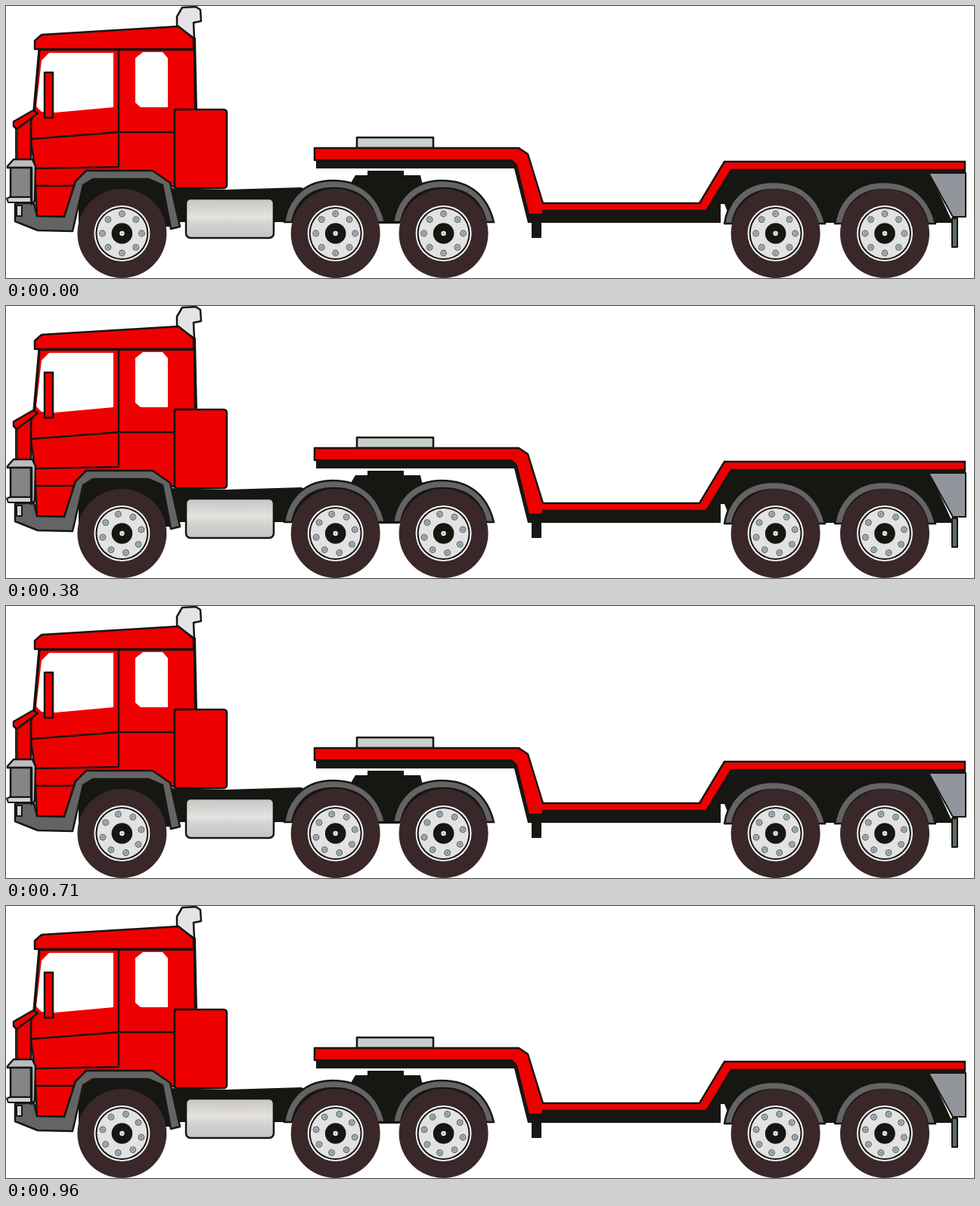
Recreate the animation shown at these times as an HTML page. Size 1280 by 360 pixels, loop 1 s.

```html
<!DOCTYPE html>
<html lang="en">
<head>
<meta charset="utf-8">
<title>Low-loader truck</title>
<style>
html, body { margin: 0; width: 100%; height: 100%; overflow: hidden; background: #fff; }
svg { display: block; width: 1280px; height: 360px; }
.k { fill: #161613; }
.r { fill: #ef0000; }
.g { fill: #646464; }
.o { stroke: #161613; stroke-width: 2.5; stroke-linejoin: round; }
.l { fill: none; stroke: #161613; stroke-width: 2.3; }
</style>
</head>
<body>
<svg viewBox="0 0 1280 360" xmlns="http://www.w3.org/2000/svg">
  <defs>
    <linearGradient id="steel" x1="0" y1="0" x2="0" y2="1">
      <stop offset="0" stop-color="#c6c6c6"/>
      <stop offset=".25" stop-color="#d6d4d2"/>
      <stop offset=".45" stop-color="#e6e3df"/>
      <stop offset=".65" stop-color="#d2d2d2"/>
      <stop offset="1" stop-color="#c4c4c6"/>
    </linearGradient>
    <g id="arch">
      <path class="k" d="M-57 287A57 51 0 0 1 57 287Z"/>
      <path class="g o" d="M-67 286C-62 253-38 231-3 231C35 231 58 252 66 286L56 286C50 259 32 241-2 241C-33 241-52 259-57 286Z"/>
    </g>
    <g id="nut">
      <circle r="4.4" fill="#5f666c"/>
      <circle r="3.2" fill="#a9b4bc"/>
      <circle r="1.5" fill="#87929a"/>
    </g>
  </defs>

  <!-- chassis -->
  <path class="k" d="M215 241L292 243L390 240L420 250L420 286L215 286Z"/>
  <path class="k" d="M450 240L456 234L462 224L478 224V218H526V224H548L550 233L560 240V270L520 288H490L460 270Z"/>
  <rect class="o" x="238" y="255" width="116" height="52" rx="6" fill="url(#steel)"/>

  <!-- cab -->
  <path class="o" fill="#e3e3e6" d="M226 26V14L233 2L251 1L257 5L258 20L248 22L249 43Z"/>
  <path class="k" d="M247 41L251 42L253 137H247Z"/>
  <path class="r o" d="M44 58H249L250 137H223V240L207 232L192 218H106L92 232L77 279H41L38 214L33 178V152L38 137Z"/>
  <path class="r o" d="M38 57V46L47 38L228 27L248 43V57Z"/>
  <path fill="#fff" d="M57 62H142V134L65 141L47 140L40 133L47 72Z"/>
  <path class="l" style="stroke-width:3.4" d="M44 58L37 139"/>
  <path fill="#fff" d="M181 61H207L214 69V134H178L171 128V69Z"/>
  <path class="l" d="M149 58V213M34 176L149 167H223M39 215L149 213M39 238H90"/>
  <rect class="r o" x="51" y="88" width="11" height="60"/>
  <path class="r o" d="M14 163L35 147L33 152V205H14Z"/>
  <path class="l" style="stroke:#1d3020;stroke-width:4" d="M14 162V204"/>
  <path class="r o" d="M10 153L36 138L42 142L14 163L10 159Z"/>
  <rect class="r o" x="223" y="137" width="69" height="104" rx="4"/>

  <!-- bumper and front arch -->
  <path class="k" d="M96 262L103 236L115 229H189L208 237L220 292H96Z"/>
  <path class="g o" d="M12 261H37L41 278L77 279L92 232L106 218H194L217 234L230 292L218 295L207 237L188 229H115L102 237L88 298L42 297L12 285Z"/>
  <path class="o" fill="#bdbdc0" d="M2 212L10 203H35L39 212L38 258L34 262V214H2Z"/>
  <rect class="o" x="6" y="214" width="27" height="39" fill="#858585"/>
  <path class="o" style="stroke-width:2" fill="#d0d0d2" d="M1 255L5 253H33V260H3Z"/>
  <rect class="o" style="stroke-width:2" x="14" y="264" width="7" height="14" fill="#d2d2d4"/>

  <!-- trailer -->
  <rect class="o" x="464" y="174" width="101" height="14" fill="#c8d0ca"/>
  <path class="k" d="M410 202H670L710 270H922L954 214H1269V222H1222L1252 287H960L950 262H945V287H690L672 215H410Z"/>
  <rect class="k" x="695" y="285" width="13" height="22"/>
  <path class="r o" d="M408 188H678L690 196L710 261H917L950 206H1268V217H959L926 271H710V276H691L675 211L668 204H408Z"/>
  <path class="o" style="stroke-width:2" fill="#92959b" d="M1220 221H1269V279H1252Z"/>
  <rect class="o" style="stroke-width:2" x="1251" y="281" width="7" height="38" fill="#5a6b5e"/>

  <use href="#arch" x="435"/>
  <use href="#arch" x="579"/>
  <use href="#arch" x="1017" y="2"/>
  <use href="#arch" x="1163" y="2"/>
  <g id="wheels"></g>
</svg>
<script>
const axles = [153.4, 435.7, 578.6, 1017.6, 1162];
const LOOP = 1000, STEPS = 24, TURN = -11.25;

const nuts = Array.from({ length: 8 }, (_, i) =>
  `<use href="#nut" transform="rotate(${i * 45}) translate(0 -26)"/>`).join('');

document.getElementById('wheels').innerHTML = axles.map(x => `
  <g transform="translate(${x} 301)">
    <circle r="59" fill="#39272a"/>
    <circle r="37" fill="#f6f6f6"/>
    <circle r="35" fill="#161613"/>
    <circle r="33" fill="#e2e2e2"/>
    <g class="spin">${nuts}</g>
    <circle r="13.8" fill="#161613"/>
    <circle r="3.2" fill="#e8e8e8"/>
    <circle r="1.3" fill="#a8a8a8"/>
  </g>`).join('');

const spins = document.querySelectorAll('.spin');

// 24 even steps, each starting on a whole hundredth of a second
function stepAt(ms) {
  const cs = Math.floor((ms % LOOP) / 10);
  return Math.ceil((2 * cs + 1) * STEPS / 200) - 1;
}

function draw(ms) {
  const angle = stepAt(ms) * TURN;
  spins.forEach(s => s.setAttribute('transform', `rotate(${angle})`));
}

const start = performance.now();
function tick() {
  draw(performance.now() - start);
  requestAnimationFrame(tick);
}
draw(0);
requestAnimationFrame(tick);
</script>
</body>
</html>
```
